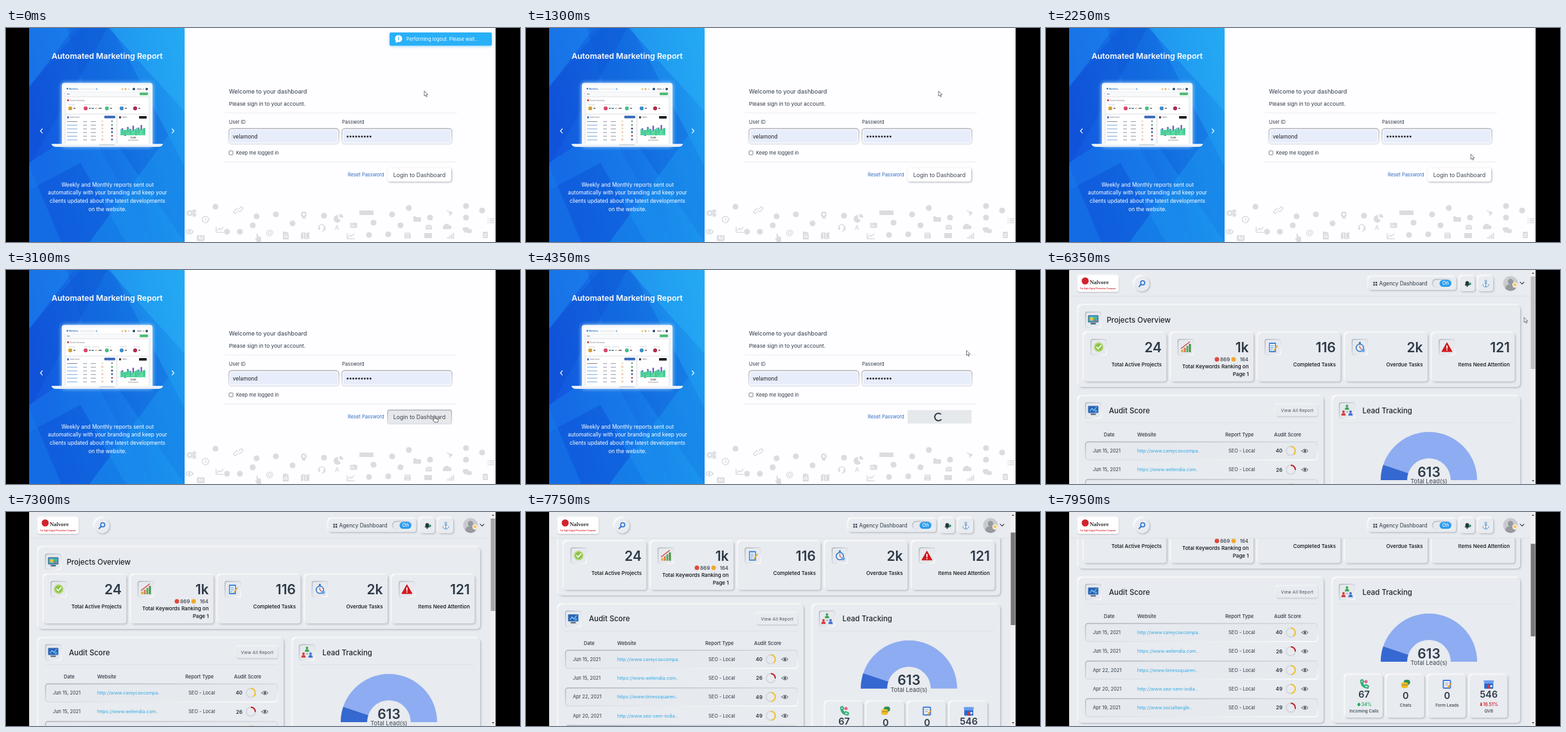
An HTML page that plays this animation: 800 px wide and 333 px high, repeating every 8 s.

```html
<!DOCTYPE html>
<html lang="en">
<head>
<meta charset="utf-8">
<title>Dashboard login</title>
<style>
html,body{margin:0;width:100%;height:100%;overflow:hidden;background:#000}
svg{display:block;width:800px;height:333px;font-family:Inter,"Open Sans",sans-serif}
.up{filter:drop-shadow(1.6px 1.6px 1.5px #a9aeb6) drop-shadow(-1.4px -1.4px 1.2px #fff)}
.soft{filter:drop-shadow(.8px 1px 1px #b4b8bf) drop-shadow(-.8px -.8px .8px #fff)}
.glow{filter:drop-shadow(0 0 3px #bfe6ff)}
.toast{filter:drop-shadow(0 1px 2px #9bd6f8)}
</style>
</head>
<body>
<svg id="stage" viewBox="0 0 800 333">
<defs>
<linearGradient id="blue" x1="0" y1=".25" x2="1" y2="0"><stop stop-color="#1259df"/><stop offset=".5" stop-color="#1679e7"/><stop offset="1" stop-color="#20a2f1"/></linearGradient>
<linearGradient id="dent" x1="0" y1="0" x2="1" y2="1"><stop stop-color="#aeb3bb"/><stop offset=".5" stop-color="#d6dae0"/><stop offset="1" stop-color="#fff"/></linearGradient>
<linearGradient id="edge" x2="0" y2="1"><stop stop-color="#adb0b8"/><stop offset="1" stop-color="#dcdfe6"/></linearGradient>
<clipPath id="page"><rect x="36" width="726" height="333"/></clipPath>
<clipPath id="side"><rect x="36" width="242" height="333"/></clipPath>
</defs>
</svg>
<script>
const INK = '#2d3947', BG = '#e8ebef', WALL = '#dcdce0';
const rect = (x, y, w, h, fill, r = 0, more = '') =>
  `<rect x="${x}" y="${y}" width="${w}" height="${h}" rx="${r}" fill="${fill}" ${more}/>`;
const circ = (x, y, r, fill, more = '') => `<circle cx="${x}" cy="${y}" r="${r}" fill="${fill}" ${more}/>`;
const path = (d, fill, more = '') => `<path d="${d}" fill="${fill}" ${more}/>`;
const line = (d, color, w = 1, more = '') =>
  path(d, 'none', `stroke="${color}" stroke-width="${w}" stroke-linecap="round" stroke-linejoin="round" ${more}`);
const at = (x, y, body, id = '') => `<g ${id && `id="${id}"`} transform="translate(${x} ${y})">${body}</g>`;
// y is the middle of the capitals
const text = (x, y, s, size, fill = INK, weight = 400, anchor = 'start', more = '') =>
  `<text x="${x}" y="${y + size * .36}" font-size="${size}" fill="${fill}" font-weight="${weight}" text-anchor="${anchor}" ${more}>${s}</text>`;
const raised = (x, y, w, h, r = 4, cls = 'up', fill = BG) => rect(x, y, w, h, fill, r, `class="${cls}"`);
const dented = (x, y, w, h, r = 4, fill = '#e6e9ee') => rect(x, y, w, h, fill, r, 'stroke="url(#dent)" stroke-width="1.5"');
const ring = (x, y, r, color, w, part, turn = 0) => circ(x, y, r, 'none',
  `stroke="${color}" stroke-width="${w}" pathLength="100" stroke-dasharray="${part} ${100 - part}" transform="rotate(${turn} ${x} ${y})"`);

// ---------- login page ----------
function laptop() {
  let s = `<g class="glow">${rect(87, 85.5, 141, 99, '#f4f7fb', 4)}</g>` + rect(91, 90, 133, 91, '#fff', 1);
  s += text(94, 95, '● Marketly', 3.4, '#2a6fc4', 600) + rect(115, 93, 24, 4, '#f1f2f4', 1) +
    circ(141, 95, 1, '#4a90d9') + circ(181, 95, 1.6, '#e3c58b') + circ(186, 95, 1.6, '#e0a94d') +
    circ(191, 95, 1.6, '#d9d9d9') + circ(199, 95, 2, '#2c4c74') + rect(204, 94, 7, 2, '#a9b0b8') +
    circ(214, 95, 1.6, '#ccd') + circ(219, 95, 2, '#3c5066');
  s += rect(91, 99, 133, 82, '#eceef2') + rect(93, 100, 129, 6, '#f8f9fb') + rect(95, 102, 4, 1.5, '#99a') +
    rect(208, 100.5, 13, 4, '#49b96d', 1);
  s += rect(93, 108, 129, 25, '#fff', 1) + rect(95, 111, 3, 3, '#e2574c') + text(99.5, 112.7, 'Project Overview', 2.8, '#667') ;
  ['#d2a13a', '#d8476b', '#5aa0db', '#4cbf8b', '#3d8ec4', '#b0284a'].forEach((c, i) => {
    const x = [100, 124, 137, 157, 180, 201][i];
    if (i != 2) s += circ(x, 125, 3.1, c) + rect(x + 5, 124, 3, 2, '#888');
    else s += rect(133, 124, 4, 2, c) + rect(139, 124, 2, 2, '#e7a93c') + rect(144, 124, 5, 2, '#88a');
    s += rect(x - 3, 119, 11, 1, '#d5d8dd');
  });
  s += rect(93, 135, 78, 45, '#fff', 1) + rect(95, 137.5, 3, 3, '#4879c6') + text(99.5, 139, 'Audit Score', 2.8, '#667') +
    rect(153, 136.5, 17, 4, '#3668b7', 1);
  for (let i = 0; i < 6; i++) {
    const y = 145 + i * 5.7;
    s += rect(95, y, 16, 1.1, i ? '#83ade2' : '#8a9099') + rect(120, y, 6, 1.1, '#9aa2ab') + rect(132, y, 8, 1.1, '#9aa2ab') +
      circ(150, y, 1.6, i % 2 ? '#f0c3a4' : '#e8dfc3') + circ(165, y, 1.5, ['#999', '#5aa469', '#3d4a5c', '#2f55a0', '#c05b5b', '#5a6fb5'][i]);
  }
  s += rect(174, 135, 48, 45, '#fff', 1) + rect(176, 137.5, 3, 3, '#333') + text(180, 139, 'Traffic', 2.8, '#667') +
    rect(207, 137, 12, 4, '#222', 1);
  for (let i = 0; i < 9; i++)
    s += rect(180 + i * 4.2, 166 - [10, 7, 12, 9, 14, 8, 11, 15, 10][i], 2.4, 9, '#775bc0');
  s += path('M178 167V157l7 2 6-3 6 4 7-5 6 3 7-3v12z', '#3fd490', 'opacity=".85"') +
    text(198, 171, '13.89', 3.4, '#333', 600, 'middle') + rect(190, 174, 16, 1, '#aaa');
  return s + path('M71 181h173q-1 4-8 4H79q-7 0-8-4z', '#e9eef6') + rect(71, 180.4, 173, 1.3, '#fff') + rect(145, 181, 24, 1.6, '#c5d0de', .8);
}

function sidePanel() {
  const shade = (d, c, o) => path(d, c, `opacity="${o}"`);
  let s = rect(36, 0, 242, 333, 'url(#blue)') +
    shade('M36 0h70L36 92z', '#1f8af0', .5) + shade('M36 92L116 0h42L36 215z', '#0b46c9', .3) +
    shade('M95 0h70l113 215V333L130 120z', '#0c57d4', .35) + shade('M160 0h118v130z', '#2bb3f7', .45) +
    shade('M36 210l90-60 100 183H36z', '#1a86ee', .4) + shade('M36 333V252l80-42 70 123z', '#0a4fd3', .45) +
    shade('M130 333l148-200v200z', '#1c9af0', .45) + shade('M36 215l50 118H36z', '#1677ea', .6);
  s += text(157.5, 43.5, 'Automated Marketing Report', 12.4, '#fff', 600, 'middle') + laptop();
  ['Weekly and Monthly reports sent out', 'automatically with your branding and keep your',
    'clients updated about the latest developments', 'on the website.']
    .forEach((row, i) => s += text(158, 243.7 + i * 12.8, row, 8.28, '#fff', 400, 'middle'));
  return `<g clip-path="url(#side)">${s}</g>` + line('M56.5 157l-3 3.2 3 3.2M258.5 157l3 3.2-3 3.2', '#fff', 1.2);
}

function iconWall() {
  const c = WALL, k = (d, w = 1.6) => line(d, c, w);
  const gear = (x, y, r) => circ(x, y, r, 'none', `stroke="${c}" stroke-width="2"`) +
    circ(x, y, r + 1.4, 'none', `stroke="${c}" stroke-width="1.6" pathLength="16" stroke-dasharray="1"`);
  const card = (x, y, w = 11, h = 8) => rect(x - w / 2, y - h / 2, w, h, c, 1.2);
  const cut = d => line(d, '#fff', 1);
  let s = gear(286, 288, 3) + gear(293, 285, 1.3) + gear(293, 291, 1.3);
  s += circ(310.5, 298, 5, 'none', `stroke="${c}" stroke-width="1.6"`) + k('M310.5 295v3.4l2 1.2', 1.2);
  s += k('M360 286l-2 2a2 2 0 0 1-3-3l3-3a2 2 0 0 1 3 0M363 281l2-2a2 2 0 0 1 3 3l-3 3a2 2 0 0 1-3 0', 1.6);
  for (const [x, y] of [[332, 314], [536, 324]]) s += k(`M${x - 5} ${y - 4}v8h11M${x - 3} ${y + 1}l3-3 2 2 4-4`);
  s += k('M279.5 317q6-7 12 0q-6 7-12 0z') + circ(285.5, 317, 2, c);
  s += card(303, 327, 12, 9) + text(303, 327, 'Ad', 5.5, '#fff', 700, 'middle') + text(410.5, 318, '@', 12, c, 600, 'middle');
  s += path('M390 320v8l-3-1 4 6h6v-8l-5-1v-4z', c) + path('M431 317h6l3 3v9h-9z', c) + cut('M433 325l3-4 2 4z');
  s += path('M459 319l4-1.500 4 1.500 5-1.500v10l-5 1.500-4-1.500-4 1.500z', c) + cut('M463 319v8M467 320v8');
  s += circ(463.5, 290, 4.6, c) + circ(463.5, 290, 2, '#fff') + path('M461 293h5v4l-2.500-1-2.500 1z', c);
  s += k('M486.500 311a5 5 0 0 1 10 0v3l-4 2', 1.5) + rect(486, 310, 3, 4, c, 1) + rect(494, 310, 3, 4, c, 1);
  s += path('M517 291v5l4 4a6 6 0 1 1-4-9z', c) + path('M519 289a6 6 0 0 1 6 6h-6z', c) + text(515, 311, 'A', 9, c, 700, 'middle');
  s += card(541, 307) + cut('M537 305h3M537 308h6') + card(625, 323, 10, 9) + cut('M621 321h8M623 325h4');
  s += path('M634 293h4l1 1.500h7v7h-12z', c) + card(658, 310, 10, 7) + cut('M654 308l4 3 4-3') + card(657, 323, 12, 8);
  s += path('M681 313a3 3 0 0 1 0-5 5 5 0 0 1 9-1 3 3 0 0 1 1 6z', c);
  for (let i = 0; i < 4; i++) s += rect(687 + i * 2.8, 325 - i * 2, 2, 3 + i * 2, c);
  s += k('M687 284l4 4M691 288l3-1M691 288v4', 1.5) + circ(692, 288, 2.4, c);
  s += rect(711, 310, 9, 6, c, 2) + rect(716, 313, 9, 6, c, 2) + path('M713 315v4l4-3z', c);
  s += k('M750 297h1M753 297h7M750 300h1M753 300h7M750 303h1M753 303h7', 1.4) + card(746, 322, 8, 10) + cut('M744 321h4M744 324h4');
  // plain discs stand where marks would be
  [[326, 278], [344, 317], [364, 317], [384, 307], [390, 293], [420, 290], [446, 304], [495, 292], [572, 303], [565, 322],
    [595, 321], [601, 290], [627, 280], [614, 307], [660, 295], [716, 277], [716, 295], [741, 284]]
    .forEach(([x, y]) => s += circ(x, y, 4.6, c));
  return s + rect(550, 284, 22, 7, c);
}

const field = (x, y, w) => rect(x, y, w, 23, '#e7edfb', 4, 'stroke="#fff" stroke-width="3"') +
  rect(x - .5, y - .5, w + 1, 24, 'none', 4.500, 'stroke="url(#edge)" stroke-width="1.400"');

function loginPage() {
  let s = rect(278, 0, 484, 333, '#fefdff') + sidePanel() + iconWall();
  s += text(347, 99, 'Welcome to your dashboard', 9.14) + text(347, 118, 'Please sign in to your account.', 8.23) +
    rect(340, 131.600, 362, .8, '#e5e6ea') + rect(340, 208, 362, .8, '#e5e6ea') +
    text(347, 146.500, 'User ID', 7.4) + text(523, 146.500, 'Password', 7.5) + field(347.500, 157, 170) + field(523.500, 157, 170) +
    text(353, 168.500, 'velamond', 8.4, '#222');
  for (let i = 0; i < 9; i++) s += circ(531.700 + i * 4.45, 169, 1.45, '#222');
  s += rect(347.200, 191.200, 6, 6, '#fff', 1, 'stroke="#777" stroke-width=".9"') + text(358, 194.500, 'Keep me logged in', 7.55) +
    text(532, 228.600, 'Reset Password', 7.47, '#2f6cc0');
  const label = text(643.500, 228.600, 'Login to Dashboard', 8.8, '#3c4450', 400, 'middle');
  s += `<g id="idle">${raised(594, 218, 99, 21, 4, 'up', '#fff')}${label}</g>` +
    `<g id="pressed">${rect(594, 218, 99.500, 21.500, '#e6e8ec', 3, 'stroke="url(#edge)" stroke-width="1.500"')}${label}</g>` +
    `<g id="busy">${rect(594, 218, 99.500, 21, '#e6e9ec')}${at(642, 228.700, `<g id="spinner">${ring(0, 0, 5.800, '#333a42', 2, 76)}</g>`)}</g>`;
  return s + `<g id="toast">${rect(597, 7, 159, 20.500, '#28b0f7', 2, 'class="toast"')}${circ(611, 16.500, 5.600, '#fff')}${
    path('M607 20l-1 3 4-1z', '#fff')}${text(611, 16.500, 'i', 8, '#28b0f7', 700, 'middle')}${
    text(623, 17.200, 'Performing logout. Please wait...', 7.37, '#fff')}</g>`;
}

// ---------- dashboard ----------
const icons = {
  monitor: rect(-8, -7, 16, 11, '#2b4e74', 1) + rect(-7, -6, 14, 9, '#35b3d8') + rect(-5, -4, 5, 5, '#f0c23a') + rect(1, -4, 4, 3, '#59b75a') + rect(1, 0, 4, 2, '#e2574c') + rect(-4, 5, 8, 2, '#2b4e74'),
  screen: rect(-8, -7, 16, 11, '#2c63b5', 1) + line('M-5 1l3-4 3 3 4-5', '#7fd4ff', 1.2) + circ(4, 1, 2, '#4aa5e8') + rect(-4, 5, 8, 2, '#4a5c70'),
  people: [[0, -5, '#3aa655'], [-5.500, 4, '#d33a3a'], [5.500, 4, '#3c6fd1']].map(([x, y, c]) => circ(x, y - 2, 1.900, c) + path(`M${x - 3.400} ${y + 4}q0-4 3.400-4t3.400 4z`, c)).join('') + line('M0 1v2M-2 3l2-1 2 1', '#999', .7),
  tray: rect(-5, -8, 10, 9, '#8fb4e8', 1) + rect(-3, -5, 6, 1, '#fff') + path('M-8-1h4l2 3h4l2-3h4v8H-8z', '#3b76cc'),
  check: circ(0, 0, 7.500, '#b3d977') + circ(0, 0, 5.500, '#8dc14b') + line('M-3 0l2.200 2.500L3.500-2.500', '#fff', 1.800),
  bars: [0, 1, 2, 3].map(i => rect(-7 + i * 4, 4 - i * 3, 3, 4 + i * 3, ['#d9a53c', '#e2774c', '#59a75a', '#4a8f43'][i])).join('') + line('M-7 2L6-8', '#d33a3a', 1.3),
  list: rect(-6, -7, 11, 15, '#3f86d8', 1) + rect(-4.500, -5, 8, 11, '#e8f2fd') + line('M-3-2h4M-3 1h4M-3 4h2', '#5a8fca', 1) + line('M2 5l5-7', '#e5a52f', 1.800),
  watch: circ(0, 1, 6.500, '#3e7cc4') + circ(0, 1, 4.800, '#eef5fc') + rect(-1.500, -8, 3, 3, '#3e7cc4') + line('M0-2v3l2 2', '#d33a3a', 1.100) + circ(5, 5, 2.800, '#6aa5e0'),
  alert: path('M0-7L8 7H-8z', '#d0181c', 'stroke="#d0181c" stroke-linejoin="round"') + rect(-.900, -2.500, 1.800, 5, '#fff') + circ(0, 4.600, 1, '#fff'),
  phone: line('M-5-6q0 11 11 12l1-3-4-2-2 1.500q-3-2-3.500-5l2-1.500-2-3z', '#2fae74', 2) + circ(3, -4, 2.500, '#e5668b'),
  chat: rect(-3, -7, 10, 8, '#2d8f5a', 4) + rect(-7, -3, 11, 9, '#f2bd27', 4) + line('M-4 1h0M-1 1h0M2 1h0', '#444', 1.500),
  form: rect(-7, -7, 13, 14, '#3f7bd8', 2) + rect(-5, -5, 9, 10, '#f4f7fd') + line('M-3-2h5M-3 1h4', '#88a', 1) + line('M1 5l5-6', '#e79a2b', 2),
  shop: rect(-7, -6, 14, 13, '#2d66c9', 1) + path('M-8-6H8l-1 5H-7z', '#6b9df0') + rect(-2, 1, 4, 6, '#c33b50') + circ(4, 3, 1.700, '#fff')
};
const badge = (x, y, name, r = 12) => dented(x - r, y - r, 2 * r, 2 * r, 3) + at(x, y, icons[name]);
const loader = (x, y) => at(x, y, `<g class="loader">${ring(0, 0, 9, '#35b56f', 1.600, 25, 130)}${ring(0, 0, 9, '#35b56f', 1.600, 25, -50)}${
  ring(0, 0, 3.600, '#dc4a3d', 1.500, 28, 130)}${ring(0, 0, 3.600, '#3f7fe0', 1.500, 28, -50)}</g>`);
const button = (x, y, w, s) => raised(x, y, w, 18, 3, 'soft') + text(x + w / 2, y + 9, s, 6.600, '#465060', 400, 'middle', 'letter-spacing=".22"');
const title = (x, y, s) => text(x, y, s, 11.450, '#1f262e', 500);
const split = (x, w) => rect(x, 40, w, .700, '#dadee3');

function overviewCards() {
  return [['24', 'check', 'Total Active Projects'], ['1k', 'bars', 'Total Keywords Ranking on', 'Page 1'],
    ['116', 'list', 'Completed Tasks'], ['2k', 'watch', 'Overdue Tasks'], ['121', 'alert', 'Items Need Attention']]
    .map(([value, icon, label, more], i) => {
      const x = 59.500 + i * 135.500, end = x + 120.500;
      let s = raised(x, 98.500, 128, 75, 4) + badge(x + 22.500, 120, icon) + text(end, 120.500, value, 21, INK, 600, 'end');
      s += text(end, more ? 150.500 : 147, label, 8, '#0c0f13', 500, 'end');
      if (more) s += text(end, 162, more, 8, '#0c0f13', 500, 'end') + circ(266, 139, 3.500, '#e2473c') + text(271, 139, '869', 8, '#4d545c', 600) +
        circ(292, 139, 3.500, '#f0a830') + text(315, 139, '164', 7.700, '#4d545c', 600, 'end');
      return s;
    }).join('');
}

function auditTable() {
  const head = (x, s) => text(x, 59.500, s, 7.600, INK, 500);
  let s = head(90, 'Date') + head(142, 'Website') + head(279, 'Report Type') + head(355, 'Audit Score');
  [['Jun 15, 2021', 'http://www.careycoxcompa..', 40], ['Jun 15, 2021', 'https://www.welendia.com..', 26],
    ['Apr 22, 2021', 'https://www.timessquaren..', 49], ['Apr 20, 2021', 'http://www.seo-sem-india..', 49],
    ['Apr 19, 2021', 'http://www.socialtangle..', 29]].forEach(([date, url, score], i) => {
    const y = 84.500 + i * 29.250, color = score < 30 ? '#c0222f' : '#f2c230';
    if (i % 2 == 0) s += dented(61.500, y - 14, 361, 28, 4);
    s += text(73, y, date, 7.400) + text(142, y, url, 7.250, '#2fa9e6') + text(284, y, 'SEO - Local', 7.400) + text(368, y, score, 8, INK, 600, 'end') +
      circ(381, y, 7, 'none', 'stroke="#d5d8dc" stroke-width="2"') + ring(381, y, 7, color, 2, score, -90) +
      line(`M398 ${y}q5-5.500 10 0q-5 5.500-10 0z`, '#59616b', 1) + circ(403, y, 1.900, '#59616b');
  });
  return s;
}

function leadChart() {
  const a = Math.PI * 18.500 / 180, cx = 596, cy = 130;
  const point = (r, b) => `${cx - r * Math.cos(b)} ${cy - r * Math.sin(b)}`;
  const band = (from, to, c) => path(`M${point(75, from)}A75 75 0 0 1 ${point(75, to)}L${point(34, to)}A34 34 0 0 0 ${point(34, from)}z`, c);
  let s = band(0, Math.PI, '#8eacf1') + band(0, a, '#3568d0') + text(596, 117, '613', 21, INK, 600, 'middle') +
    text(596, 132, 'Total Lead(s)', 9.300, '#3c4550', 400, 'middle');
  [['67', 'phone', 'Incoming Calls', '⬆34%', '#21a95c'], ['0', 'chat', 'Chats'], ['0', 'form', 'Form Leads'], ['546', 'shop', 'QVB', '⬇16.51%', '#d32a37']]
    .forEach(([n, icon, label, change, color], i) => {
      const x = 495 + i * 64.700;
      s += raised(x - 29, 151, 58, 66, 4) + at(x, 165, icons[icon]) + text(x, change ? 181 : 183, n, 14.500, INK, 600, 'middle');
      if (change) s += text(x, 196.500, change, 7, color, 600, 'middle');
      s += text(x, change ? 206.500 : 198, label, 6.500, '#39424d', 500, 'middle');
    });
  return s;
}

function header() {
  let s = rect(36, 0, 718, 41, BG) + rect(36, 40.500, 718, .800, '#d9dde3') + raised(49, 8, 64, 26, 4, 'soft', '#fff');
  s += circ(61, 17, 5.500, '#d2222d') + text(68, 19, 'Nalvore', 8.800, '#333', 700, 'start', 'font-family="Liberation Serif,serif"') +
    text(81, 29, 'Far Sight Digital Promotion Company', 3.150, '#d2222d', 600, 'middle');
  s += raised(138, 10, 23, 23, 11.500) + circ(150.500, 20, 3.200, 'none', 'stroke="#2b6fd0" stroke-width="1.600"') + line('M148 22.500l-3 3.200', '#2b6fd0', 1.900);
  let tools = raised(535, 11, 136, 20, 4);
  for (const [x, y] of [[542, 18.500], [545.500, 18.500], [542, 22], [545.500, 22]]) tools += rect(x, y, 2.300, 2.300, '#2d3947');
  tools += text(551, 21, 'Agency Dashboard', 8.300) + dented(634, 14.500, 30, 12.500, 6) + rect(645, 15.300, 18.500, 11, '#2a9df0', 5.500) +
    text(654.300, 20.800, 'On', 7.400, '#fff', 500, 'middle');
  tools += raised(677, 10, 23, 23, 4) + path('M684 24q1.300-1 1.300-4a2.800 2.800 0 0 1 5.600 0q0 3 1.300 4z', '#26353f') + circ(688, 25, 1.200, '#26353f') + circ(692.300, 21.500, 2, '#2f9e62');
  s += `<g id="tools">${tools}</g><g id="anchor">${raised(673, 10, 23, 23, 4)}${circ(684.500, 17, 1.400, 'none', 'stroke="#5b96d6"')}${
    line('M684.500 18.500v8M682.500 20.300h4M679.800 22.500q.500 4 4.700 4t4.700-4', '#5b96d6', 1)}</g>`;
  s += circ(723, 21, 11.500, '#c9cbce') + circ(723, 18, 4.200, '#96999d') + path('M715 29q0-7 8-7t8 7a11 11 0 0 1-16 0z', '#96999d') +
    circ(730, 23.500, 4, '#fbeed5') + text(730, 23.500, 'N', 5, '#f09a1c', 700, 'middle');
  return s + line('M738 18.800l3 3 3-3', '#333', 1.100);
}

function dashboard() {
  const overview = rect(51, 55.500, 687, 106, BG, 5, 'class="up" id="overviewBox"') + badge(73.500, 77.500, 'monitor') + title(94.500, 78, 'Projects Overview') +
    `<g id="overviewWait">${loader(394, 124.500)}</g><g id="overviewData">${overviewCards()}</g>`;
  const audit = rect(51, 0, 381, 101, BG, 5, 'class="up" id="auditBox"') + badge(73.500, 21.500, 'screen') + title(98, 21.500, 'Audit Score') +
    button(359, 12.500, 64, 'View All Report') + split(61, 362) + `<g id="auditWait">${loader(240.500, 64.500)}</g><g id="auditData">${auditTable()}</g>`;
  const lead = rect(447, 0, 291, 101, BG, 5, 'class="up" id="leadBox"') + badge(468.500, 21.500, 'people') + title(492.500, 21.500, 'Lead Tracking') +
    split(457, 271) + `<g id="leadWait">${loader(591, 73)}</g><g id="leadData">${leadChart()}</g>`;
  const list = raised(51, 0, 687, 110, 5) + badge(73.500, 22, 'tray') + title(94.500, 22, 'Project List') + button(476, 12, 58, 'Project Status') +
    dented(540, 11, 154, 22, 4) + text(545, 21.500, 'Search Project..', 8.300, '#7d858f') +
    circ(680, 21.500, 3.800, 'none', 'stroke="#1e9be8" stroke-width="1.800"') + line('M683 24.500l3 3', '#1e9be8', 2.200) +
    raised(700, 12, 29, 20, 4, 'soft') + path('M706 19h9l-3.500 4v4l-2-1v-3z', '#2d3947') + path('M717 24l2.200-2.500 2.200 2.500z', '#2d3947');
  return rect(36, 0, 718, 333, BG) + `<g id="content">${overview}${at(0, 176, audit, 'audit')}${at(0, 176, lead, 'lead')}${at(0, 293, list, 'list')}</g>` + header() +
    rect(754, 0, 8, 333, '#f1f1f1') + path('M756 6l2-2.500 2 2.500z', '#555') + path('M756 327l2 2.500 2-2.500z', '#555') + rect(754.500, 10, 7, 179, '#c1c1c1', 0, 'id="thumb"');
}

const stage = document.getElementById('stage');
stage.insertAdjacentHTML('beforeend', `<g clip-path="url(#page)"><g id="loginPage">${loginPage()}</g><g id="dashPage">${dashboard()}</g></g>
  <g id="cursor"><g id="arrow">${path('M0 0v8l1.900-1.700 1.300 2.900 1.300-.600-1.300-2.800h2.500z', '#fff', 'stroke="#555" stroke-width=".800"')}</g>
  <g id="hand">${path('M-.900 1q.900-1.500 1.800 0v4l4 1.200q1 .500.700 2L4.700 11H0l-2.800-4q.300-1.300 1.900.200z', '#fff', 'stroke="#444" stroke-width=".800"')}</g></g>`);

// ---------- motion ----------
const $ = Object.fromEntries([...stage.querySelectorAll('[id]')].map(e => [e.id, e]));
const loaders = stage.querySelectorAll('.loader');
const show = (on, ...names) => names.forEach(n => $[n].style.display = on ? '' : 'none');
const move = (el, x, y) => el.setAttribute('transform', `translate(${x} ${y})`);
const clamp = v => Math.min(1, Math.max(0, v));
const LOADED = { page: 4600, overview: 5850, panels: 6200 };
const track = [[0, 651, 98], [700, 651, 98], [1300, 642, 98], [1700, 642, 98], [2500, 667, 226], [3400, 667, 226],
  [3850, 685.500, 125], [4400, 685.500, 125], [5300, 725.500, 64.500], [5900, 725.500, 64.500], [6700, 757, 80]];

function pointer(t) {
  const i = track.findIndex(p => p[0] > t);
  if (i < 0) return track.at(-1).slice(1);
  const [t0, x0, y0] = track[i - 1], [t1, x1, y1] = track[i], k = (t - t0) / (t1 - t0), e = k * k * (3 - 2 * k);
  return [x0 + (x1 - x0) * e, y0 + (y1 - y0) * e];
}

function draw(t) {
  const onDash = t >= LOADED.page, hasOverview = t >= LOADED.overview, hasPanels = t >= LOADED.panels;
  const over = t >= 2400 && t < 3500, busy = t >= 3400;
  show(!onDash, 'loginPage');
  show(onDash, 'dashPage');
  show(!over && !busy, 'idle');
  show(over && !busy, 'pressed');
  show(busy, 'busy');
  $.toast.style.opacity = 1 - clamp((t - 850) / 250);
  // the spinner stalls while the next page is fetched
  const spin = t < 4100 ? Math.min(t, 3850) : t - 250;
  $.spinner.setAttribute('transform', `rotate(${40 + (spin - 4100) * .48})`);
  loaders.forEach(l => l.setAttribute('transform', `rotate(${(t - 5500) * .3})`));

  show(hasOverview, 'overviewData', 'anchor');
  show(!hasOverview, 'overviewWait');
  show(hasPanels, 'auditData', 'leadData');
  show(!hasPanels, 'auditWait', 'leadWait');
  const top = hasOverview ? 197 : 176, height = hasPanels ? 225 : 101;
  $.overviewBox.setAttribute('height', hasOverview ? 126.500 : 105.500);
  for (const n of ['audit', 'lead']) {
    move($[n], 0, top);
    $[n + 'Box'].setAttribute('height', height);
  }
  move($.list, 0, top + height + 16);
  move($.tools, hasOverview ? -32.500 : 0, 0);

  const scroll = clamp((t - 7500) / 450);
  move($.content, 0, -94 * scroll);
  $.thumb.setAttribute('y', 10 + 39.500 * scroll);
  $.thumb.setAttribute('height', hasPanels ? 144 : 179);
  $.thumb.setAttribute('fill', t >= 7450 ? '#787878' : t >= 6700 ? '#a8a8a8' : '#c1c1c1');

  move($.cursor, ...pointer(t));
  show(t < 6700, 'cursor');
  show(over, 'hand');
  show(!over, 'arrow');
}

const start = performance.now();
function tick() {
  draw(Math.floor((performance.now() - start) % 8000 / 50) * 50);
  requestAnimationFrame(tick);
}
tick();
</script>
</body>
</html>
```
